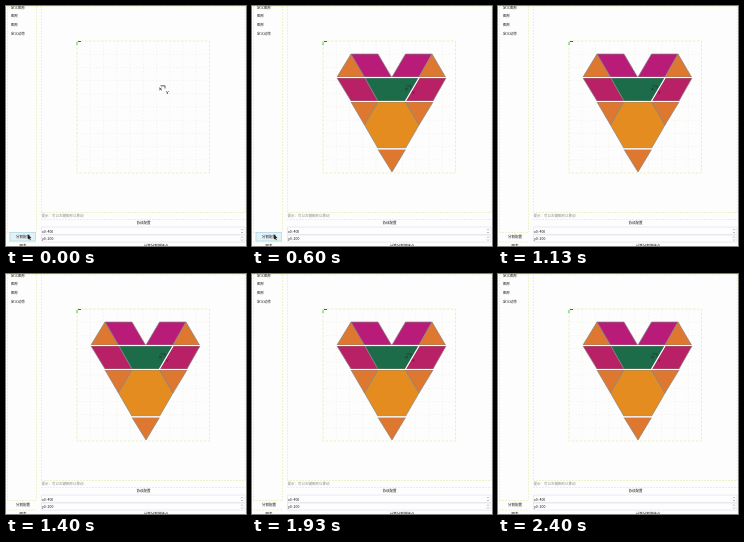
Animation of 240x240 px, one loop 2470 ms. Source, as an HTML page:

```html
<!DOCTYPE html>
<html lang="en">
<head>
<meta charset="utf-8">
<title>Heart tiling</title>
<style>
html, body { margin: 0; width: 100%; height: 100%; overflow: hidden; background: #fff; }
svg { display: block; width: 100vw; height: 100vh; }
text { font: 500 3.5px "Noto Sans CJK SC", "Noto Sans CJK", "Noto Sans", sans-serif; fill: #111; }
.mid { text-anchor: middle; }
.line { fill: none; stroke: #eceec0; stroke-width: .8; stroke-dasharray: 2 1; }
.field { fill: none; stroke: #e6e2ee; stroke-width: .8; }
.grid { fill: none; stroke: #efefe6; stroke-width: .7; stroke-dasharray: 1.3 2; }
.frame { fill: none; stroke: #f0edac; stroke-width: .9; stroke-dasharray: 2.5 1.5; }
.tile { stroke: #858580; stroke-width: .7; stroke-linejoin: round; }
.gap { fill: none; stroke: #fff; stroke-width: 1.2; }
.axes { fill: none; stroke: #333; stroke-width: .8; }
.pink { fill: #b81c78; }
.rose { fill: #b82165; }
.green { fill: #1c6c49; }
.gold { fill: #e58c20; }
.amber { fill: #de772f; }
.heart { animation: show 2470ms step-end infinite; }
.hover { animation: hide 2470ms step-end infinite; }
@keyframes show { 0% { opacity: 0; } 24%, 100% { opacity: 1; } }
@keyframes hide { 0% { opacity: 1; } 32.4%, 100% { opacity: 0; } }
</style>
</head>
<body>
<svg viewBox="0 0 240 240">
  <rect width="240" height="240" fill="#fdfdfd"/>
  <path class="line" d="M1 .4H240M1.5 0V226M30.5 0V226M35.5 0V206M239.3 0V206M1 226.5H31"/>
  <path class="line" d="M35 206.5H240M35 213.5H240M1 236H31"/>
  <path class="field" d="M35.5 221H239V228.5H35.5ZM35.5 229H239V236H35.5Z"/>

  <text x="5" y="3.3">定义图形</text>
  <text x="5" y="11.3">图形</text>
  <text x="5" y="19.8">图形</text>
  <text x="5" y="29">定义动作</text>

  <path id="grid" class="grid"/>
  <rect class="frame" x="71" y="35" width="132.5" height="132"/>
  <path d="M71 36V39" stroke="#3fd63f" stroke-width="1"/>
  <path d="M72 35.5H75" stroke="#b33" stroke-width="1"/>

  <g class="heart">
    <path class="tile amber" d="M99 48L112.5 71H85Z"/>
    <path class="tile pink" d="M99 48H126L139.5 71H112.5Z"/>
    <path class="tile pink" d="M153.5 48H180L167 71H140Z"/>
    <path class="tile amber" d="M180 48L193.5 71H167Z"/>
    <path class="tile rose" d="M85 72H113L126 95H99Z"/>
    <path class="tile green" d="M113 72H167L153.5 95H126Z"/>
    <path class="tile rose" d="M167 72H194L181 95H153.5Z"/>
    <path class="tile amber" d="M99 96H126L112.5 119Z"/>
    <path class="tile gold" d="M126 96H153.5L167 119L153.5 142.3H126L112.5 119Z"/>
    <path class="tile amber" d="M153.5 96H181L167 119Z"/>
    <path class="tile amber" d="M126 143.5H153.5L140 166Z"/>
    <path class="gap" d="M85 71.5H194M99 95.5H181M126 142.9H154M167 72L153.5 95"/>
  </g>

  <path class="axes" d="M154.5 79.8H159V82.5M153 81.7L156 84.3M155.5 81.7L153.3 84.3M160.2 85.3L161.3 86.6L162.5 85.3M161.3 86.6V88"/>

  <text x="35.5" y="211.3" style="fill:#888">提示：可以左键图形以移动</text>
  <text class="mid" x="137.5" y="218.4">协议配置</text>
  <text x="36" y="226.5">x0: 400</text>
  <text x="36" y="233.8">y0: 200</text>
  <path d="M235 224.2l1-1 1 1M235 226l1 1 1-1M235 231.7l1-1 1 1M235 233.5l1 1 1-1" fill="none" stroke="#777" stroke-width=".5"/>
  <text class="mid" x="150" y="241">计算分割拼接点</text>

  <rect class="hover" x="4" y="226.5" width="25.5" height="8.5" fill="#e4f2f8" stroke="#a9d5e6" stroke-width=".7"/>
  <text class="mid" x="17" y="232.3">分割配置</text>
  <text class="mid" x="17" y="241">图表</text>
  <path class="hover" d="M22 228.5V233.5L23.2 232.4L24 234.2L24.8 233.8L24 232.1H25.5Z" fill="#222"/>
</svg>
<script>
const step = 13.25;
let d = "";
for (let i = 1; i < 10; i++) {
  d += `M${71 + i * step} 35V167M71 ${35 + i * 13.2}H203.5`;
}
document.getElementById("grid").setAttribute("d", d);
</script>
</body>
</html>
```
